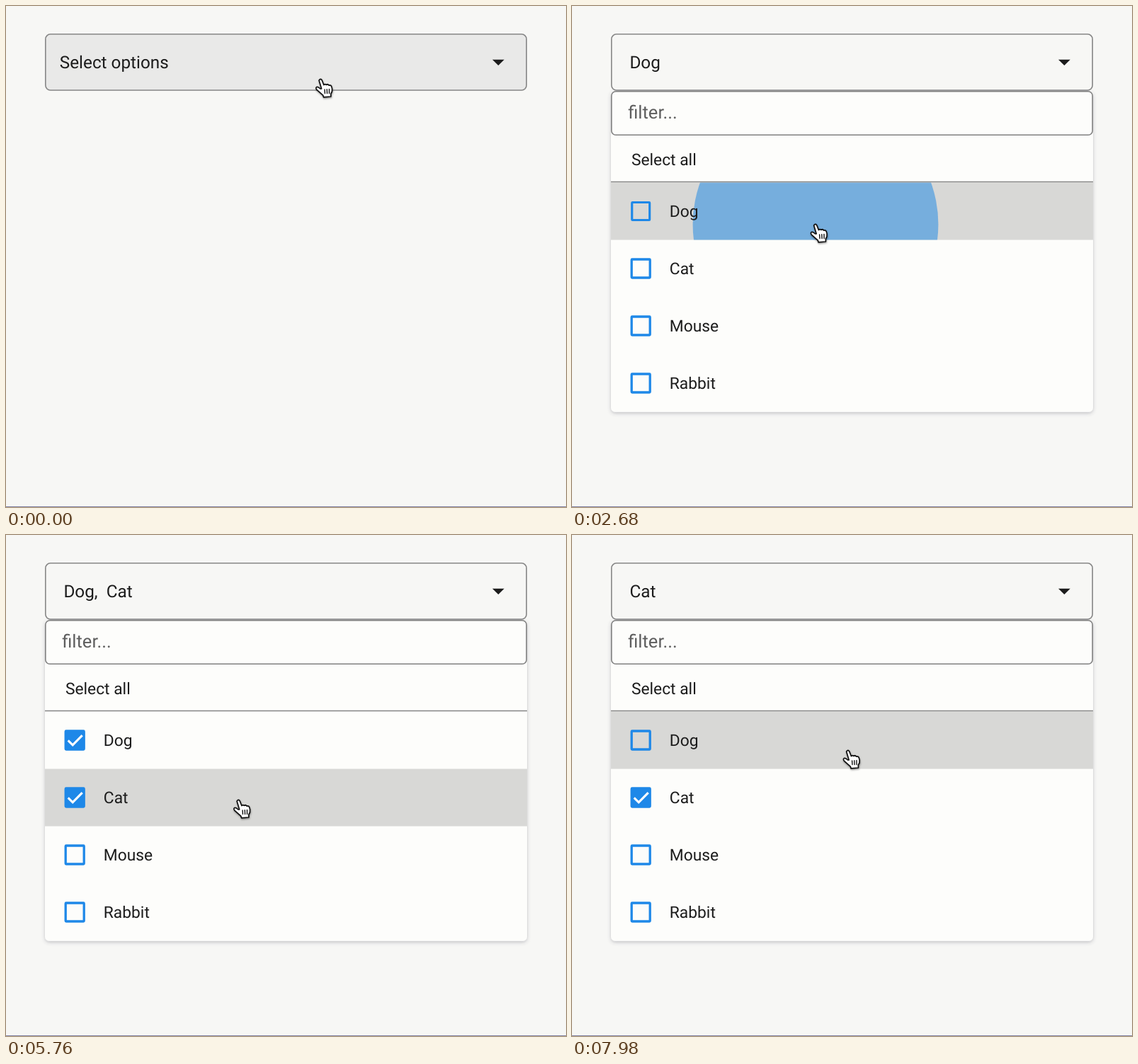
Recreate the animation shown at these times as an HTML page. Size 791 px wide and 708 px high, loop 8 s.

```html
<!DOCTYPE html>
<html lang="en">
<head>
<meta charset="utf-8">
<title>Multi-select dropdown</title>
<style>
html, body { margin: 0; width: 100%; height: 100%; overflow: hidden; background: #f7f7f5; }
svg { display: block; width: 791px; height: 708px; font-family: Roboto, sans-serif; fill: #1c1c1c; }
text { text-rendering: geometricPrecision; }
</style>
</head>
<body>
<svg id="stage" viewBox="0 0 791 708">
  <defs>
    <filter id="shadow" x="-5%" y="-5%" width="110%" height="110%">
      <feDropShadow dx="0" dy="2" stdDeviation="2.6" flood-color="#44445c" flood-opacity=".3"/>
    </filter>
    <filter id="handShadow" x="-30%" y="-30%" width="170%" height="170%">
      <feDropShadow dx="0.5" dy="1.5" stdDeviation="1" flood-color="#000" flood-opacity=".4"/>
    </filter>
  </defs>
  <rect width="791" height="708" fill="#f7f7f5"/>
  <rect y="707" width="791" height="1" fill="#8585a6"/>
  <rect id="field" x="55.8" y="39.8" width="679.4" height="79.2" rx="7" stroke="#878787" stroke-width="1.6"/>
  <text id="value" y="87.7" font-size="24.3"></text>
  <path d="M687 75.700h16.800l-8.400 8.400z"/>
  <g id="panel">
    <rect x="55" y="120" width="681" height="453.700" rx="6" fill="#fdfdfb" filter="url(#shadow)"/>
    <g id="rows"></g>
    <rect x="55.8" y="120.8" width="679.4" height="61.4" rx="6" fill="#fdfdfb" stroke="#808080" stroke-width="1.6"/>
    <text x="79.2" y="158.700" font-size="25.5" fill="#5e5e5e">filter...</text>
    <text x="83.9" y="224.700" font-size="22.8">Select all</text>
    <path d="M55 248.5H736" stroke="#858585" stroke-width="1.5"/>
  </g>
  <g id="hand" stroke-linejoin="round" stroke-linecap="round" filter="url(#handShadow)">
    <path d="M-2.4 1.6Q-.6-1.6 1.6 1L4.4 8Q6 6.200 8 7.800Q10 6.400 11.600 8.600Q14 7.600 15.200 10Q16.800 13.500 16 17.500L14.400 20.500V24.500L4.200 25.400L3.200 22.600L-5.800 14.600Q-7.400 12-5.600 11Q-3.400 10.400-.8 13.300L1.200 13.500Z" fill="#fff" stroke="#111" stroke-width="1.7"/>
    <path d="M5.600 14.500L6 20M8.800 14.200L9.100 20M12 14L12.100 20" fill="none" stroke="#111" stroke-width="1.4"/>
  </g>
</svg>
<script>
const LOOP = 8000, BLUE = '#1e88e8', ROW_H = 81, TOP = 249.5, LEFT = 55, RIGHT = 736;
const OPEN = 200;
const $ = id => document.getElementById(id);
const set = (el, attrs) => { for (const k in attrs) el.setAttribute(k, attrs[k]); };
const clamp = v => Math.max(0, Math.min(1, v));

// Each press focuses a row; the release toggles it.
const clicks = [
  { row: 0, down: 2540, up: 2643, on: true, value: 'Dog' },
  { row: 1, down: 4660, up: 4765, on: true, value: 'Dog,\u00a0 Cat' },
  { row: 0, down: 6580, up: 6680, on: false, value: 'Cat' }
];

// Pointer path: time, x, y of the fingertip
const path = [
  [820, 444.5, 103.5], [1187, 394, 193.500], [1560, 346, 301.5], [1840, 344, 308.5],
  [3180, 344, 308.5], [3520, 326, 369.5], [3940, 325, 378.5],
  [5720, 325, 378.5], [6460, 390, 304.5]
];

const rows = ['Dog', 'Cat', 'Mouse', 'Rabbit'].map((name, i) => {
  const y = TOP + i * ROW_H, cy = 290 + i * ROW_H;
  $('rows').insertAdjacentHTML('beforeend', `<g>
    <clipPath id="clip${i}"><rect x="${LEFT}" y="${y}" width="${RIGHT - LEFT}" height="${ROW_H}"/></clipPath>
    <rect x="${LEFT}" y="${y}" width="${RIGHT - LEFT}" height="${i < 3 ? ROW_H : ROW_H - 1}"/>
    <circle clip-path="url(#clip${i})" fill="#1e88e5"/>
    <g><rect x="-13" y="-13" width="26" height="26" rx=".8" stroke="${BLUE}" stroke-width="3.3"/>
    <path d="M-9.500 .3L-3 6.800L10.500-6.900" pathLength="1" fill="none" stroke="#fff" stroke-width="3.100"/></g>
    <text x="137.800" y="${cy + 8.200}" font-size="22.8">${name}</text></g>`);
  const [, back, ripple, box] = $('rows').lastElementChild.children;
  return { cy, back, ripple, box, square: box.children[0], mark: box.children[1] };
});

// cubic-bezier(0, 0, .2, 1)
function easeOut(x) {
  let lo = 0, hi = 1;
  for (let i = 0; i < 20; i++) {
    const s = (lo + hi) / 2;
    if (.6 * s * s * (1 - s) + s ** 3 < x) lo = s; else hi = s;
  }
  return lo * lo * (3 - 2 * lo);
}

function pointer(t) {
  let i = 1;
  while (i < path.length - 1 && t > path[i][0]) i++;
  const [t0, x0, y0] = path[i - 1], [t1, x1, y1] = path[i];
  const k = clamp((t - t0) / (t1 - t0));
  return [x0 + (x1 - x0) * k, y0 + (y1 - y0) * k];
}

function recorded(t) {
  const beat = Math.floor((t - 20) / 140), p = t - 20 - beat * 140;
  const step = p < 100 ? 0 : p < 120 ? 1 : 2;
  return 20 + beat * 140 + step * 140 / 3;
}

function drawRow(r, i, t, hovered, focused) {
  const last = clicks.filter(c => c.row === i && t >= c.up).pop();
  set(r.back, { fill: ['none', '#e9e9e8', '#d8d8d6'][hovered + focused] });

  const age = last ? t - last.up : Infinity;
  const on = last ? (age > 50 ? last.on : !last.on) : false;
  const dip = age < 125 ? .05 * Math.sin(Math.PI * age / 125) : 0;
  set(r.box, { transform: `translate(97.200 ${r.cy}) scale(${1 - dip})` });
  set(r.square, { fill: on ? BLUE : 'none' });
  const drawn = last && last.on ? clamp((age - 45) / 140) : 1;
  set(r.mark, { 'stroke-dasharray': `${drawn} 2`, visibility: on ? 'visible' : 'hidden' });

  let radius = 0, opacity = 0;
  if (last && age < 320) {
    const [x, y] = pointer(last.up);
    const top = TOP + i * ROW_H;
    const reach = Math.hypot(Math.max(x - LEFT, RIGHT - x), Math.max(y - top, top + ROW_H - y));
    radius = reach * easeOut(clamp(age / 225));
    opacity = .52 * Math.exp(-Math.max(0, age - 37) / 38);
    set(r.ripple, { cx: x, cy: y });
  }
  set(r.ripple, { r: radius, opacity });
}

function draw(time) {
  const t = recorded(time);
  const [x, y] = pointer(t);
  const pressed = clicks.filter(c => t >= c.down).pop();
  const chosen = clicks.filter(c => t >= c.up).pop();
  const hover = y >= TOP ? Math.floor((y - TOP) / ROW_H) : -1;

  set($('hand'), { transform: `translate(${x} ${y})` });
  set($('field'), { fill: y < 120 ? '#e9e9e8' : '#f7f7f5' });
  set($('value'), { x: chosen ? 81.4 : 75.8 });
  $('value').textContent = chosen ? chosen.value : 'Select options';
  set($('panel'), { opacity: clamp((t - OPEN) / 120) });
  rows.forEach((r, i) => drawRow(r, i, t, +(i === hover), +(!!pressed && pressed.row === i)));
}

const start = performance.now();
function tick() {
  draw((performance.now() - start) % LOOP);
  requestAnimationFrame(tick);
}
tick();
</script>
</body>
</html>
```
